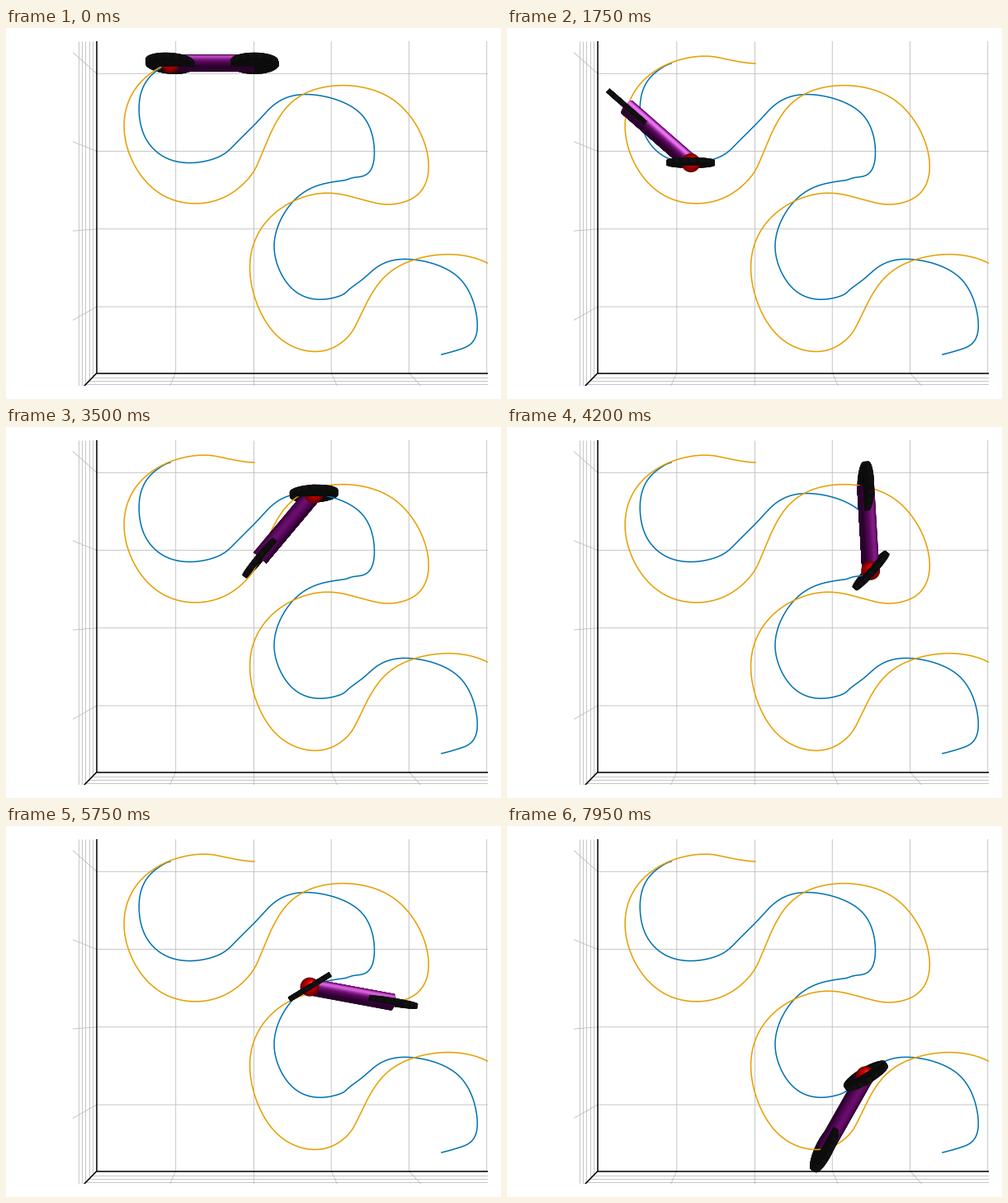
Animation, 600 px wide and 450 px high, one loop 8000 ms. Source, as a matplotlib script:

```python
import numpy as np
import matplotlib.pyplot as plt
from matplotlib.animation import FuncAnimation
from matplotlib.collections import LineCollection, PolyCollection
from matplotlib.patches import Circle

W, H, DPI = 600, 450, 100
FRAMES, STEP = 160, 50
LEFT, RIGHT, TOP, BOTTOM = 80.5, 584, 16, 434
EYE = np.array([305.0, 228.0])      # point straight below the camera
DEPTH = 0.0019                      # outward spread per pixel of height
BASE, WHEEL_R, WHEEL_T, TUBE_R, BALL_R = 102, 28.8, 2.7, 10.2, 11.5
LIGHT = np.array([0.3, -0.5, 0.81])

# The ride lasts two swings of the steering. Poses are set every half second
# and once more wherever the steering is at its limit.
SWING, STEER = 5.0, 52
KEY_TIMES = np.sort(np.r_[np.arange(0, 10.1, 0.5), np.arange(1.25, 10, 2.5)])
# front hub x, y and the angle from front to rear hub in degrees
POSES = [
    (199, 43, 0), (184.5, 50.5, 5), (161.6, 90, 33), (167, 129, 63.5),
    (191, 156, 99), (251, 159, 176), (279, 139.5, 223), (309, 109, 247),
    (373, 81, 230), (430, 104, 185), (446.5, 152.5, 128), (424.5, 181, 58),
    (412.5, 184.3, 12.5), (392, 187.5, -11), (341, 219, 4.5),
    (325, 265, 38.5), (342, 311, 85.5), (398, 327, 170.5), (416, 317, 217),
    (437.5, 300.3, 242), (495, 281, 227.5), (549, 303, 187),
    (570.8, 352, 135), (551, 389.5, 55), (528, 396, 10)]


def spline(t, y, at):
    """Natural cubic spline through the rows of y at times t."""
    h, n = np.diff(t), len(t)
    a, b = np.eye(n), np.zeros_like(y)
    slope = np.diff(y, axis=0) / h[:, None]
    for i in range(1, n - 1):
        a[i, i - 1:i + 2] = h[i - 1], 2 * (h[i - 1] + h[i]), h[i]
        b[i] = 6 * (slope[i] - slope[i - 1])
    m = np.linalg.solve(a, b)
    i = np.clip(np.searchsorted(t, at) - 1, 0, n - 2)
    u, v, h = ((at - t[i])[:, None], (t[i + 1] - at)[:, None], h[i][:, None])
    return ((m[i] * v**3 + m[i + 1] * u**3) / (6 * h)
            + (y[i] / h - m[i] * h / 6) * v
            + (y[i + 1] / h - m[i + 1] * h / 6) * u)


def heading(degrees):
    a = np.radians(degrees)
    return np.stack([np.cos(a), -np.sin(a)], axis=-1)


def ride(times):
    """Rear hub, front hub, frame direction and front wheel direction."""
    p = spline(KEY_TIMES, np.array(POSES, float), times)
    front, back = p[:, :2], heading(p[:, 2])
    turn = STEER * np.sin(2 * np.pi * times / SWING)
    return front + BASE * back, front, -back, heading(p[:, 2] + turn)


def normal(d):
    return np.array([-d[1], d[0]])


def project(p, h):
    return EYE + (p - EYE) * (1 + DEPTH * np.asarray(h))[..., None]


def half_wheel(p, d, up):
    a = np.linspace(0, np.pi, 19)
    h = WHEEL_R * np.sin(a) * (1 if up else -1)
    mid = p + np.outer(WHEEL_R * np.cos(a), d)
    one, two = (project(mid + s * WHEEL_T * normal(d), h) for s in (-1, 1))
    rim = [np.array([one[i], one[i + 1], two[i + 1], two[i]])
           for i in range(len(a) - 1)]
    middle = np.array([one[0], one[-1], two[-1], two[0]])
    return [one, two, middle] + rim


def tube(rear, front, d):
    """Lengthwise strips, each lying over the rest of the one before."""
    a = np.linspace(-np.pi / 2, np.pi / 2, 31)
    side, h = np.outer(TUBE_R * np.sin(a), normal(d)), TUBE_R * np.cos(a)
    start, end = project(rear + side, h), project(front + side, h)
    strips = [np.r_[start[i:], end[i:][::-1]] for i in range(len(a) - 1)]
    m = (a[1:] + a[:-1]) / 2
    lit = np.sin(m) * (normal(d) @ LIGHT[:2]) + np.cos(m) * LIGHT[2]
    lit = np.clip(lit, 0.36, 1)[:, None]
    color = lit * (118, 8, 122) + lit**13 * (137, 125, 140)
    return strips, np.clip(color / 255, 0, 1)


fig = plt.figure(figsize=(W / DPI, H / DPI), dpi=DPI, facecolor="white")
ax = fig.add_axes([LEFT / W, 1 - BOTTOM / H, (RIGHT - LEFT) / W,
                   (BOTTOM - TOP) / H])
ax.set_xlim(LEFT, RIGHT)
ax.set_ylim(BOTTOM, TOP)
ax.axis("off")

# floor grid, the two walls seen edge-on, and the black axis lines
CX, CY, CELL = 110, 418.5, 94.25
grid = []
for i in range(-1, 4):
    x = 300 + CELL * i
    grid.append([(x, TOP), (x, CY), (x + 7.1 * i, BOTTOM)])
for i in range(4):
    y = 55.3 + CELL * i
    spread = (y - EYE[1]) / (EYE[0] - CX)
    grid.append([(LEFT, y + spread * (CX - LEFT)), (CX, y), (RIGHT, y)])
for i in range(1, 6):
    gap = 0.9 + 4.3 * i
    grid.append([(CX - gap, TOP), (CX - gap, CY + gap), (RIGHT, CY + gap)])
ax.add_collection(LineCollection(grid, colors="#bcbcbc", linewidths=0.6,
                                 zorder=1))
ax.add_collection(LineCollection(
    [[(CX, TOP), (CX, CY), (RIGHT, CY)], [(CX, CY), (94.5, 434.5)]],
    colors="black", linewidths=1.1, zorder=1.5))

rear_path, front_path, *_ = ride(np.linspace(0, 2 * SWING, 1500))
ax.plot(*front_path.T, color="#0072b2", lw=1.1, zorder=3)
ax.plot(*rear_path.T, color="#e69f00", lw=1.1, zorder=3)


def layer(z, color):
    c = PolyCollection([], facecolors=color, edgecolors="face",
                       linewidths=0.4, zorder=z)
    ax.add_collection(c, autolim=False)
    return c


lower = layer(2, "#0c0c0c")
body = layer(4, "purple")
upper = layer(6, ["#0c0c0c"] * 3 + ["#121212", "#0e0e0e"] * 9)
body.set_linewidth(0)

ball = []
for q in np.linspace(0, 1, 11):
    tint = (min(1, 0.42 + 0.65 * q), 0.3 * q**6, 0.3 * q**6)
    c = Circle((0, 0), BALL_R * (1 - 0.88 * q), color=tint, lw=0, zorder=5)
    ball.append((ax.add_patch(c), LIGHT[:2] * BALL_R * 0.8 * q))

poses = list(zip(*ride(np.arange(FRAMES) * STEP / 1000)))


def draw(k):
    rear, front, d, steer = poses[k]
    for part, up in ((lower, False), (upper, True)):
        part.set_verts(half_wheel(rear, d, up) + half_wheel(front, steer, up))
    strips, colors = tube(rear, front, d)
    body.set_verts(strips)
    body.set_facecolor(colors)
    for c, shift in ball:
        c.set_center(front + shift)
    return [lower, body, upper] + [c for c, _ in ball]


anim = FuncAnimation(fig, draw, frames=FRAMES, interval=STEP, repeat=True,
                     repeat_delay=0, blit=False)
plt.show()
```
